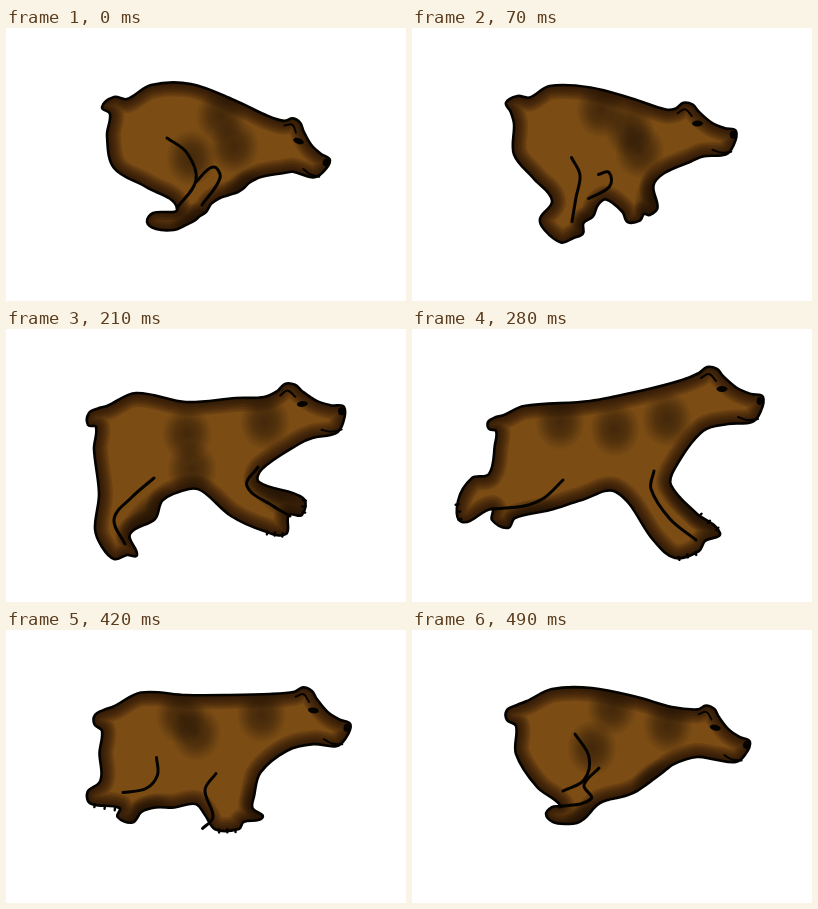
Animation, 400 px wide and 273 px high, one loop 0.56 s. Source, as an HTML page with a canvas:

```html
<!DOCTYPE html>
<html lang="en">
<head>
<meta charset="utf-8">
<title>Running bear</title>
<style>
html, body { margin: 0; width: 100%; height: 100%; overflow: hidden; background: #fff; }
canvas { display: block; width: 400px; height: 273px; }
</style>
</head>
<body>
<canvas id="stage" width="400" height="273"></canvas>
<script>
const ctx = document.getElementById('stage').getContext('2d');
const STEP = 70, FUR = '#7b4c14', INK = '#050300', SHADE = '28,15,3';

// Each pose lists the same landmarks: back, throat, forelegs, belly, hind legs, rump, tail.
// head: nose x, nose y, turn, scale. toe: landmark where the hind claws start.
const crouch = {
  head: [324, 132, 0.35, 0.88], toe: 20,
  back: [121,71, 145,57, 185,56, 228,72, 262,88],
  fore: [278,145, 255,149, 243,155, 238,160, 232,164, 226,166, 220,168, 214,170, 209,173, 205,176],
  hind: [200,184, 194,188, 188,193, 178,198, 168,202, 150,201, 141,194, 147,185, 171,180],
  rump: [140,159, 108,140, 101,108, 104,86, 96,79, 108,69],
  creases: [[161,110, 181,125, 190,152, 171,180], [190,154, 207,139, 214,150, 196,177]],
  patches: [215,88, 228,118, 185,130]
};
const gather = {
  head: [324, 74, -0.35, 1], toe: 19,
  back: [114,68, 130,59, 172,63, 212,69, 246,75],
  fore: [280,122, 250,141, 240,160, 253,200, 243,210, 238,206, 236,217, 217,218, 212,195, 183,167],
  hind: [172,170, 168,189, 155,197, 164,213, 155,218, 148,228, 124,210, 109,196, 109,165],
  rump: [104,143, 96,113, 103,84, 93,81, 92,70, 103,67],
  creases: [[158,149, 155,169, 138,187, 149,207], [183,139, 187,150, 181,167, 157,164],
    [216,163, 232,181, 237,197, 240,207]],
  patches: [163,76, 207,84, 270,115]
};
const reach = {
  head: [338, 78, -0.12, 1], toe: 20,
  back: [101,77, 130,64, 180,73, 230,69, 258,68],
  fore: [293,115, 256,140, 253,153, 297,169, 296,186, 283,186, 280,205, 258,202, 225,187, 196,162],
  hind: [183,160, 157,171, 149,190, 124,205, 131,226, 121,226, 108,230, 96,218, 89,200],
  rump: [93,165, 88,120, 90,98, 82,96, 83,84, 93,79],
  creases: [[148,149, 125,169, 108,190, 119,215], [252,138, 241,157, 267,177, 284,187]],
  patches: [181,105, 186,140, 259,93]
};
const stretch = {
  head: [351, 68, 0, 1], toe: 21,
  back: [92,86, 112,77, 178,72, 228,62, 270,51],
  fore: [291,102, 263,139, 259,156, 284,184, 308,204, 293,212, 287,222, 263,229, 242,212, 204,163],
  hind: [170,171, 138,181, 103,189, 96,199, 80,191, 80,180, 50,193, 46,172, 60,149],
  rump: [77,145, 83,115, 84,102, 77,100, 76,93, 84,88],
  creases: [[151,151, 132,169, 112,177, 80,180], [242,142, 239,160, 258,190, 284,211]],
  patches: [148,93, 203,100, 255,90]
};
const push = {
  head: [351, 77, 0.14, 1], toe: 21,
  back: [100,82, 130,66, 180,72, 220,63, 268,51],
  fore: [278,114, 247,151, 246,190, 251,207, 279,220, 250,223, 250,233, 214,231, 202,200, 191,175],
  hind: [155,177, 122,171, 99,175, 88,192, 68,180, 86,164, 35,163, 23,147, 38,131],
  rump: [66,130, 83,122, 88,106, 82,99, 83,90, 93,84],
  creases: [[138,151, 126,163, 108,167, 83,164], [233,149, 226,165, 235,205, 246,220]],
  patches: [150,95, 200,88, 255,75]
};
const tuck = {
  head: [338, 112, 0.2, 0.9], toe: 20,
  back: [115,71, 140,59, 180,58, 225,67, 260,77],
  fore: [285,127, 262,134, 250,143, 242,149, 234,155, 225,161, 216,165, 205,168, 196,170, 188,173],
  hind: [182,178, 177,184, 172,189, 165,193, 155,194, 141,192, 134,184, 140,177, 148,175],
  rump: [125,157, 104,124, 104,96, 95,90, 95,80, 105,75],
  creases: [[163,104, 177,127, 172,150, 151,161], [187,138, 172,155, 179,169, 147,177]],
  patches: [200,78, 180,118, 256,95]
};

// Halfway pose between two others.
function between(a, b) {
  if (typeof a === 'number') return (a + b) / 2;
  if (Array.isArray(a)) return a.map((v, i) => between(v, b[i]));
  const mid = {};
  for (const key in a) mid[key] = between(a[key], b[key]);
  mid.toe = b.toe;
  return mid;
}

const HEAD = [-64,-24, -56,-30, -46,-28, -40,-21, -26,-9, -12,-3, 0,0, -3,16, -11,25, -35,27];
const MOUTH = [-5,22, -16,23, -25,20];
const EAR = [-62,-19, -54,-23, -47,-16];

const pairs = flat => flat.flatMap((v, i) => i % 2 ? [] : [[v, flat[i + 1]]]);

function place([x, y, turn, size], local) {
  const c = Math.cos(turn) * size, s = Math.sin(turn) * size;
  return pairs(local).map(([u, v]) => [x + u * c - v * s, y + u * s + v * c]);
}

// Smooth curve whose handles never outgrow their segment.
function curve(pts, closed) {
  const n = pts.length, path = new Path2D();
  const at = i => pts[closed ? (i + n) % n : Math.max(0, Math.min(n - 1, i))];
  const handle = (i, len) => {
    const a = at(i - 1), b = at(i + 1);
    const k = len / 3 / (Math.hypot(b[0] - a[0], b[1] - a[1]) || 1);
    return [(b[0] - a[0]) * k, (b[1] - a[1]) * k];
  };
  path.moveTo(...at(0));
  for (let i = 0; i < (closed ? n : n - 1); i++) {
    const [x, y] = at(i), [u, v] = at(i + 1), len = Math.hypot(u - x, v - y);
    const h = handle(i, len), g = handle(i + 1, len);
    path.bezierCurveTo(x + h[0], y + h[1], u - g[0], v - g[1], u, v);
  }
  if (closed) path.closePath();
  return path;
}

// Soft dark patch of fur.
function patch([x, y], rx, ry, alpha, turn = 0) {
  ctx.save();
  ctx.translate(x, y);
  ctx.rotate(turn);
  ctx.scale(rx, ry);
  const g = ctx.createRadialGradient(0, 0, 0, 0, 0, 1);
  g.addColorStop(0, `rgba(${SHADE},${alpha})`);
  g.addColorStop(0.5, `rgba(${SHADE},${alpha * 0.7})`);
  g.addColorStop(1, `rgba(${SHADE},0)`);
  ctx.fillStyle = g;
  ctx.fillRect(-1, -1, 2, 2);
  ctx.restore();
}

// Shade along a limb that lies on the far side.
function limb([x, y], [u, v]) {
  const len = Math.hypot(u - x, v - y);
  patch([(x + u) / 2, (y + v) / 2], len / 2 + 16, 17, 0.7, Math.atan2(v - y, u - x));
}

function line(width, pts) {
  ctx.strokeStyle = INK;
  ctx.lineWidth = width;
  ctx.stroke(curve(pts, false));
}

function spot([x, y], rx, ry, turn) {
  ctx.fillStyle = INK;
  ctx.beginPath();
  ctx.ellipse(x, y, rx, ry, turn, 0, 7);
  ctx.fill();
}

function claws([x, y], [u, v]) {
  const dx = u - x, dy = v - y, len = Math.hypot(dx, dy);
  if (len < 14) return;
  for (const k of [0.15, 0.5, 0.85]) {
    const a = x + dx * k, b = y + dy * k;
    line(2.4, [[a, b], [a + dy / len * 3, b - dx / len * 3]]);
  }
}

function bear(pose) {
  const { head, toe } = pose;
  const marks = pairs([...pose.back, ...pose.fore, ...pose.hind, ...pose.rump]);
  const outline = curve([...marks.slice(0, 5), ...place(head, HEAD), ...marks.slice(5)], true);

  ctx.fillStyle = FUR;
  ctx.fill(outline);
  ctx.save();
  ctx.clip(outline);
  ctx.strokeStyle = `rgba(${SHADE},.13)`;
  for (let w = 4; w <= 28; w += 3) {
    ctx.lineWidth = w;
    ctx.stroke(outline);
  }
  for (const p of pairs(pose.patches)) patch(p, 25, 28, 0.6);
  limb(marks[7], marks[9]);
  limb(marks[16], marks[18]);
  ctx.restore();

  for (const c of pose.creases) line(3, pairs(c));
  for (const i of [8, 11, toe]) claws(marks[i], marks[i + 1]);
  line(2, place(head, MOUTH));
  line(2, place(head, EAR));
  spot(place(head, [-41, -8])[0], 5.5, 2.9, head[2]);
  spot(place(head, [-3, 4])[0], 3.5, 4, head[2]);
  ctx.strokeStyle = INK;
  ctx.lineWidth = 2.6;
  ctx.stroke(outline);
}

const poses = [crouch, between(crouch, gather), gather, reach, stretch, push, between(push, tuck), tuck];
const start = performance.now();
ctx.lineCap = ctx.lineJoin = 'round';

function frame() {
  const t = Math.max(0, performance.now() - start);
  ctx.fillStyle = '#fff';
  ctx.fillRect(0, 0, 400, 273);
  bear(poses[Math.floor(t / STEP) % poses.length]);
  requestAnimationFrame(frame);
}
frame();
</script>
</body>
</html>
```
